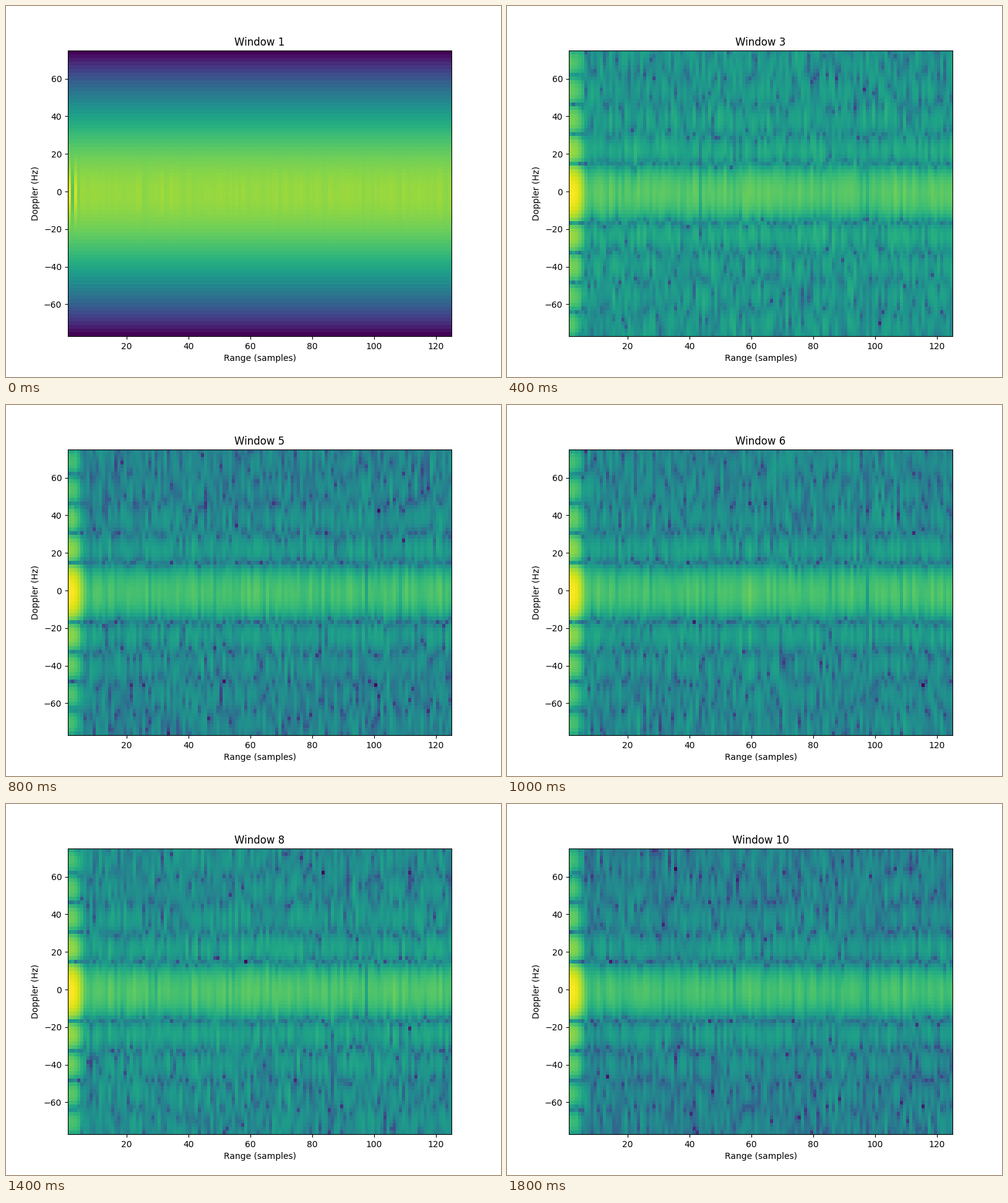
A matplotlib script that plays this animation: 800 by 600 pixels, repeating every 2 s.

```python
import numpy as np
import matplotlib.pyplot as plt
from matplotlib.animation import FuncAnimation

WINDOWS, PULSES, BINS, CELLS = 10, 10, 78, 124
STEP = 154 / BINS                      # Doppler bin width in Hz
CLUTTER, NOISE = -23, -43.3            # dB below the strongest echo
DEAD_CELL = 96

bins = np.arange(-38, 39)
cells = np.arange(CELLS)
taper = np.ones(PULSES)
taper[[0, -1]] = 0.8
dft = np.exp(-2j * np.pi * np.outer(bins, np.arange(PULSES)) / BINS) / taper.sum()


def amp(db):
    return 10 ** (db / 20)


def cnoise(rng, *shape):
    return (rng.normal(size=shape) + 1j * rng.normal(size=shape)) / np.sqrt(2)


def first_map():
    """Broad smooth lobe with a faint ripple along its ridge."""
    k = bins[:, None]
    lobe = np.cos(np.pi * k / 77) ** 0.9
    lobe = 0.838 * (lobe - lobe.min()) / (1 - lobe.min())
    ripple = np.random.default_rng(1).normal(0.004, 0.008, CELLS)
    ripple += 0.13 * (-1.0) ** cells * np.exp(-(cells / 2.6) ** 4)
    return lobe + ripple * np.exp(-(k / 6) ** 2)


def noisy_map(i):
    """Zero-padded spectrum of a static echo in noise, scaled in dB."""
    rng = np.random.default_rng(40 + i)
    fade = base_fade + 0.15 * cnoise(rng, CELLS)
    fade[DEAD_CELL] *= 0.25
    echo = amp(CLUTTER) * fade + np.exp(-(cells / 3.2) ** 2.7)
    noise = amp(NOISE) * np.sqrt(PULSES) * cnoise(rng, PULSES, CELLS)
    level = 20 * np.log10(np.abs(dft @ (taper[:, None] * echo + noise)))
    span = np.interp(i, [1, 3, 4, 8, 9], [86, 95, 80, 86, 78])
    return np.clip(1 + (level - level.max()) / span, 0, 1)


base_fade = 1 + 0.25 * cnoise(np.random.default_rng(5), CELLS)
maps = [first_map()] + [noisy_map(i) for i in range(1, WINDOWS)]

fig, ax = plt.subplots(figsize=(8, 6), dpi=100)
mesh = ax.pcolormesh(np.arange(1, CELLS + 2), np.arange(-39, 39) * STEP,
                     maps[0], cmap="viridis", vmin=0, vmax=1)
ax.set_xlabel("Range (samples)")
ax.set_ylabel("Doppler (Hz)")
title = ax.set_title("Window 1")


def update(i):
    mesh.set_array(maps[i])
    title.set_text(f"Window {i + 1}")
    return mesh, title


anim = FuncAnimation(fig, update, frames=WINDOWS, interval=200,
                     repeat=True, repeat_delay=0)
plt.show()
```
